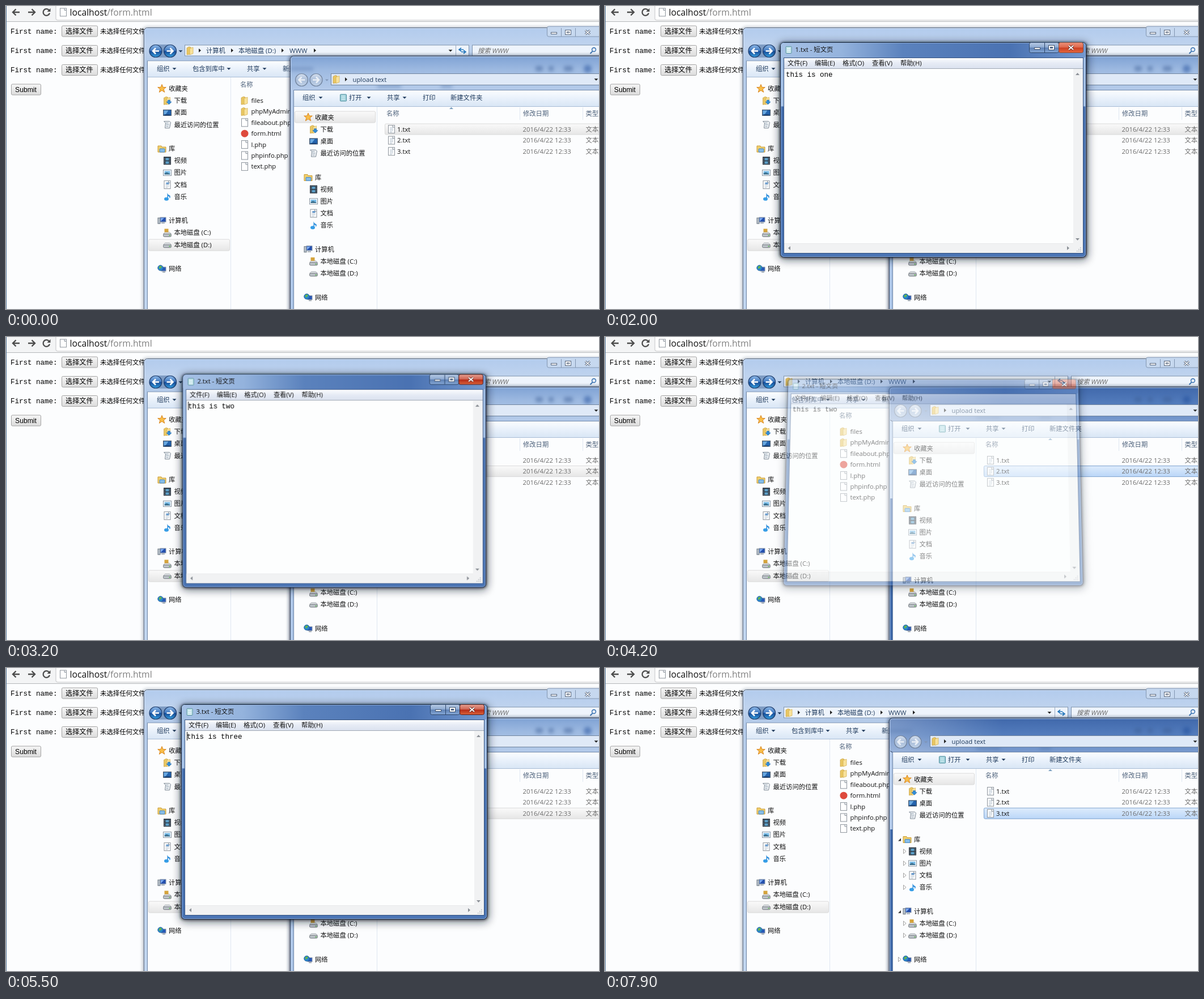
These frames come from a looping animation (1046 by 535 pixels, 8 s). An HTML page:

```html
<!DOCTYPE html>
<html lang="zh-CN">
<head>
<meta charset="utf-8">
<title>Upload form</title>
<style>
html, body { margin: 0; width: 100%; height: 100%; overflow: hidden; background: #fcfdfe; }
svg { position: absolute; left: 0; top: 0; width: 1046px; height: 535px; }
#pad { transform-origin: 579px 254px; }
text { font: 11.3px "Open Sans", "Noto Sans CJK SC", "Noto Sans CJK", sans-serif; fill: #111; white-space: pre; }
text.mono { font: 12.5px "Liberation Mono", "Noto Sans CJK SC", monospace; fill: #000; }
text.cn { font-size: 11.4px; }
text.btn { font: 12.2px "Liberation Sans", "Noto Sans CJK SC", sans-serif; fill: #000; }
text.url { font-size: 15.7px; }
text.dim { fill: #6d6d6d; }
text.head { fill: #4c607a; }
text.bar { fill: #1e395b; }
text.find { fill: #666; font-style: italic; }
</style>
</head>
<body>
<svg id="desk" viewBox="0 0 1046 535"></svg>
<svg id="pad" viewBox="0 0 1046 535"></svg>
<script>
const LOOP = 8000, STEP = 100;
const $ = id => document.getElementById(id);

// Drawing helpers
const rect = (x, y, w, h, fill, stroke = 'none', r = 0, attr = '') =>
  `<rect x="${x}" y="${y}" width="${w}" height="${h}" rx="${r}" fill="${fill}" stroke="${stroke}" ${attr}/>`;
const text = (x, mid, s, cls = '') => `<text x="${x}" y="${mid + 4}" class="${cls}">${s}</text>`;
const path = (d, fill = 'none', stroke = 'none', w = 1, attr = '') =>
  `<path d="${d}" fill="${fill}" stroke="${stroke}" stroke-width="${w}" ${attr}/>`;
const circle = (x, y, r, fill, stroke = 'none', w = 1) =>
  `<circle cx="${x}" cy="${y}" r="${r}" fill="${fill}" stroke="${stroke}" stroke-width="${w}"/>`;
const line = (x1, y1, x2, y2, c) => path(`M${x1} ${y1}L${x2} ${y2}`, 'none', c);
const group = (body, attr = '') => `<g ${attr}>${body}</g>`;
const at = (x, y, body) => group(body, `transform="translate(${x} ${y})"`);
const down = (x, y, c = '#1e395b', s = 3.5) => path(`M${x - s} ${y - s / 2}h${2 * s}l${-s} ${s}z`, c);
const right = (x, y, c = '#222') => path(`M${x - 2} ${y - 3.5}l4 3.5l-4 3.5z`, c);
const grad = (id, stops, across = false) =>
  `<linearGradient id="${id}" x2="${across ? 1 : 0}" y2="${across ? 0 : 1}">` +
  stops.map(([o, c]) => `<stop offset="${o}" stop-color="${c}"/>`).join('') + '</linearGradient>';
const blur = (id, n) => `<filter id="${id}" x="-50%" y="-50%" width="200%" height="200%"><feGaussianBlur stdDeviation="${n}"/></filter>`;

// Icons, centred on 0,0
const sheet = rect(-5.5, -7, 11, 14, '#fff', '#8d949c') + path('M2 -7v3.5h3.5', '#e8edf2', '#8d949c');
const ruled = sheet + path('M-3 -2.5h6M-3 0h6M-3 2.5h6M-3 5h4', 'none', '#aebdcb');
const folder = path('M-6 -5l4 -2l3 1v12l-7 1z', '#e9c763', '#c7a03f', .7) + path('M-1 -4l6 -2v11l-6 2z', '#f8e29b', '#d0ab4c', .7);
const screen = rect(-7, -5, 14, 10, '#2463ad', '#4b5866') + path('M-6 -4h8l-5 7h-3z', '#69a8df') + rect(-5, 3, 10, 2, '#193f70');
const disk = path('M-7 0l3 -3h8l3 3z', '#e6e9ec', '#8a9096', .8) + rect(-7, 0, 14, 5, '#bcc2c8', '#73797f', 2) + rect(3, 2, 2.5, 1.5, '#55b046');
const tower = rect(-7, -5, 4, 10, '#b9c3cd', '#69747f') + rect(-3, -6, 10, 8, '#234fae', '#8a98a8') + path('M-2 -5h6l-6 6z', '#7daaf0') + rect(-1, 3, 6, 2, '#a3adb7');
const icon = {
  sheet, ruled, folder, screen, disk, tower,
  star: path('M0 -7.5l2.1 5h5.2l-4.1 3.4l1.5 5.4l-4.7 -3.2l-4.7 3.2l1.5 -5.4l-4.1 -3.4h5.2z', '#f8bd48', '#d98520'),
  load: folder + path('M1 -1h4v3h2.5l-4.5 4.5l-4.5 -4.5h2.5z', '#2f8fdd', '#1d64a8', .7),
  recent: path('M-6 -6h10l2 2l-2 10h-8l1 -9z', '#eef1f4', '#7e8a96') + path('M-3 -3h5M-2 0h5M-2 3h4', 'none', '#8fa0b0'),
  books: path('M-7 -5h6l1 2h7v9h-14z', '#f0cf6d', '#c99b34') + rect(-4, 0, 9, 6, '#86bde8', '#4a86bb', 1),
  film: rect(-6, -6.5, 12, 13, '#27323e', '#27323e') + rect(-3, -5, 6, 4.5, '#5d9fc8') + rect(-3, 1, 6, 4.5, '#5d9fc8') + path('M-4.7 -5v11M4.7 -5v11', 'none', '#dfe5ea', .9, 'stroke-dasharray="1.5"'),
  image: rect(-7, -5, 14, 10, '#fff', '#8593a1') + rect(-5, -3, 10, 6, '#79bce8') + path('M-5 3v-2l4 -2l6 3v1z', '#3d718f'),
  doc: ruled + rect(-2, -4, 5, 3, '#6196cb'),
  note: path('M0 4v-11q1 4 5 5q1 3 -1 5q0 -4 -2.5 -4v5z', '#2c8ddb') + `<ellipse cx="-1.5" cy="4" rx="4" ry="3" fill="#369de6"/>`,
  system: at(0, 2, disk) + rect(-5, -7, 7, 6, '#d6a43c'),
  globe: rect(-1, -3, 8, 7, '#2858b8', '#8793a3') + circle(-2.5, -1.5, 4.7, '#2b87ca', '#2263a0') + path('M-5 -4q3 -2 5 0l-2 3l-3 1z', '#66b64c') + rect(1, 5, 5, 1.5, '#8c98a5'),
};

// Slot, indent, icon, label, twisty kind
const places = [
  [0, 0, 'star', '收藏夹', 1], [1, 1, 'load', '下载'], [2, 1, 'screen', '桌面'], [3, 1, 'recent', '最近访问的位置'],
  [5, 0, 'books', '库', 1], [6, 1, 'film', '视频', 2], [7, 1, 'image', '图片', 2], [8, 1, 'doc', '文档', 2], [9, 1, 'note', '音乐', 2],
  [11, 0, 'tower', '计算机', 1], [12, 1, 'system', '本地磁盘 (C:)', 2], [13, 1, 'disk', '本地磁盘 (D:)', 2], [15, 0, 'globe', '网络', 2],
];
const slotY = n => 146 + 21.2 * n;
const sidebar = () => places.map(([n, deep, pic, label]) =>
  at(275 + deep * 9.5, slotY(n), icon[pic]) + text(287 + deep * 9.5, slotY(n), label)).join('');
const twisties = () => places.filter(p => p[4]).map(([n, deep, , , kind]) => {
  const x = 262 + deep * 9, y = slotY(n);
  return kind === 1 ? path(`M${x + 2} ${y - 2}v5h-5z`, '#333') : path(`M${x - 2.5} ${y - 4}l4.5 4l-4.5 4z`, '#fff', '#a0a0a0');
}).join('');

const arrow = (x, y, dir) => path(`M${x - 6 * dir} ${y}h${11 * dir}m${-5 * dir} -5l${5 * dir} 5l${-5 * dir} 5`, 'none', '#fff', 2.6);
const navBall = (x, y, fill, edge) => circle(x, y, 11, `url(#${fill})`, edge, 1.2);

function browser() {
  const pick = y => text(8, y, 'First name:', 'mono') + rect(98.5, y - 9.5, 63, 19, 'url(#button)', '#a3a3a3', 2) +
    text(105, y, '选择文件', 'btn') + text(166, y, '未选择任何文件', 'mono cn');
  const back = 'M24 11h-12m5.5 -5.5l-5.5 5.5l5.5 5.5';
  return rect(0, 0, 1046, 27, '#f3f4f5') + rect(88, -4, 970, 29, '#fff', '#c4c6c8', 3) + line(0, 27.5, 1046, 27.5, '#b5b7ba') +
    path(back, 'none', '#4d4d4d', 2.4) + group(path(back, 'none', '#4d4d4d', 2.4), 'transform="matrix(-1 0 0 1 63 0)"') +
    path('M76 7.5a5.8 5.8 0 1 0 1 5', 'none', '#4d4d4d', 2.3) + path('M78.5 4v6h-6z', '#4d4d4d') +
    at(101, 11, sheet) +
    '<text x="112.5" y="17" class="url">localhost<tspan fill="#808080">/form.html</tspan></text>' +
    [44.5, 79, 113].map(pick).join('') +
    rect(9.5, 138, 52, 19, 'url(#button)', '#a3a3a3', 2) + text(16, 147.5, 'Submit', 'btn') +
    rect(0, 0, 1, 535, '#55789c');
}

function rearWindow() {
  const files = [['folder', 'files'], ['folder', 'phpMyAdmin'], ['sheet', 'fileabout.php'], ['', 'form.html'], ['sheet', 'l.php'], ['sheet', 'phpinfo.php'], ['sheet', 'text.php']];
  const crumb = [[353, '计算机'], [410, '本地磁盘 (D:)'], [500, 'WWW']];
  return rect(242, 38, 830, 520, '#24364f', 'none', 6, 'filter="url(#soft)" opacity=".45"') +
    rect(243.5, 38.5, 830, 520, 'url(#rearGlass)', '#4c5f7a', 6) + rect(244.5, 39.5, 830, 520, 'none', '#d8e6f8', 5) +
    rect(954.5, 36, 100, 18, '#c6d8ef', '#8296b2', 3) + line(979.5, 39, 979.5, 54, '#8296b2') + line(1004.5, 39, 1004.5, 54, '#8296b2') +
    rect(961.5, 46.5, 10, 3, '#fff', '#56647a') + rect(986.5, 42.5, 10, 8, '#fff', '#56647a') + rect(989.5, 45.5, 4, 2, '#fff', '#56647a') +
    path('M1022 43l8 7m0 -7l-8 7', 'none', '#56647a', 3.6) + path('M1022 43l8 7m0 -7l-8 7', 'none', '#fff', 1.6) +
    rect(253, 68, 48, 23, '#7f9cc3', 'none', 11) + navBall(264, 79.5, 'ball', '#22406f') + navBall(289.5, 79.5, 'ball', '#22406f') +
    arrow(264, 79.5, -1) + arrow(289.5, 79.5, 1) + down(308, 80) +
    rect(315.5, 69, 501, 19, '#eef4fc', '#7f93ad') + line(793.5, 69, 793.5, 88, '#9bacc4') + at(325, 79, icon.folder) +
    crumb.map(([x, s]) => text(x, 78.5, s, 'bar')).join('') + [342, 399, 488, 545].map(x => right(x, 78.5)).join('') + down(784, 79, '#222') +
    path('M799 77h8M803 74l-4 3l4 3M811 81h-8M807 78l4 3l-4 3', 'none', '#2779bd', 1.6) +
    rect(822.5, 69, 230, 19, '#eef4fc', '#7f93ad') + text(832, 79, '搜索 WWW', 'find') +
    circle(1037, 77, 3.4, 'none', '#4379b5', 1.6) + path('M1034.5 80l-4 4', 'none', '#4379b5', 2) +
    rect(249.5, 97, 810, 450, '#fcfdfe', '#7287a5') + rect(250, 97.5, 800, 28, 'url(#tools)') + line(250, 125.5, 1046, 125.5, '#a9bdd6') +
    [[266, '组织', 297], [329, '包含到库中', 393], [425, '共享', 456], [488, '新建文件夹']].map(([x, s, d]) => text(x, 111, s, 'bar') + (d ? down(d, 111) : '')).join('') +
    line(396.5, 126, 396.5, 535, '#dfe7f1') + rect(251.5, 412, 143, 20, 'url(#grey)', '#d9d9d9', 2) + sidebar() +
    text(413, 139, '名称', 'head') +
    files.map(([pic, s], i) => {
      const y = 167 + 19.4 * i;
      return (pic ? at(421, y, icon[pic]) : circle(421, y, 6.5, '#de4a3c')) + text(432.5, y, s);
    }).join('');
}

const rowY = i => 217.5 + 19.6 * i;
function frontWindow() {
  const smudge = [[934, 106, 13], [957, 106, 9], [984, 106, 16]].map(([x, y, w]) => rect(x, y, w, 9, '#3c5f96', 'none', 3)).join('') +
    circle(1026, 111, 7, '#1d4b9a') + rect(655, 139, 42, 5, '#4c70a5') + rect(767, 139, 20, 5, '#4c70a5') + rect(502, 108, 40, 6, '#5d7fb2');
  return rect(500, 88, 600, 500, '#13233d', 'none', 6, 'filter="url(#soft)" opacity=".8"') +
    rect(501.5, 88.5, 600, 500, 'url(#idleGlass)', '#2c405f', 6) +
    group(rect(501.5, 88.5, 600, 60, 'url(#liveGlass)', '#1d3152', 6) + rect(502, 89, 200, 59, 'url(#shine)', 'none', 5) +
      rect(502, 285, 5, 250, '#3e68a8'), 'id="live"') +
    rect(502.5, 89.5, 598, 500, 'none', '#c3d7f2', 5) + group(smudge, 'filter="url(#soft)" opacity=".5"') +
    navBall(521.5, 130.5, 'paleBall', '#71839d') + navBall(547, 130.5, 'paleBall', '#71839d') + group(arrow(521.5, 130.5, -1) + arrow(547, 130.5, 1), 'opacity=".75"') + down(566, 131, '#7f94b5', 3) +
    rect(573.5, 119.5, 500, 20, '#dfe9f7', '#71859f') + at(583, 129.5, icon.folder) + right(600, 129.5) + text(611.5, 129.5, 'upload text', 'bar') + down(1041, 130, '#222') +
    rect(507.5, 148.5, 600, 450, '#fcfdfe', '#6e86a8') + rect(508, 149, 600, 28, 'url(#tools)') + line(508, 177.5, 1046, 177.5, '#a9bdd6') +
    rect(726.5, 152, 39, 21, '#f2f8ff', '#a9c3e2', 2, 'id="toolHover"') +
    [[523, '组织', 555], [605, '打开', 640], [672, '共享', 703], [735, '打印'], [784, '新建文件夹']].map(([x, s, d]) => text(x, 162, s, 'bar') + (d ? down(d, 162) : '')).join('') +
    at(595, 162, rect(-5.5, -6, 11, 12, '#9fd0da', '#4d8d9c', 1) + path('M-3 -3h6M-3 0h6M-3 3h6', 'none', '#eafafd')) +
    line(654.5, 178, 654.5, 535, '#dfe7f1') + rect(509.5, 186, 142, 20, 'url(#grey)', '#d9d9d9', 2) +
    at(258, 50.5, sidebar() + group(twisties(), 'id="twisties"')) +
    rect(656, 178, 250, 23, '#e3f1fc', '#b9dcf4', 0, 'id="headHover"') +
    line(906.5, 179, 906.5, 201, '#dfe7f1') + line(1017.5, 179, 1017.5, 201, '#dfe7f1') + path('M782 182h7l-3.5 -3.5z', '#7da0c0') +
    [[671, '名称'], [912, '修改日期'], [1022.5, '类型']].map(([x, s]) => text(x, 190, s, 'head')).join('') +
    [0, 1, 2].map(i => rect(668.5, rowY(i) - 9.5, 400, 19, 'none', 'none', 2, `id="row${i}"`) +
      at(680, rowY(i), icon.ruled) + text(690, rowY(i), `${i + 1}.txt`) + text(911.5, rowY(i), '2016/4/22 12:33', 'dim') + text(1022.5, rowY(i), '文本文档', 'dim')).join('');
}

function editor() {
  const menu = [[322, '文件(F)'], [370, '编辑(E)'], [419, '格式(O)'], [471, '查看(V)'], [521, '帮助(H)']];
  const tip = (x, y, turn) => group(path('M-3.5 2h7l-3.5 -4z', '#8b9096'), `transform="translate(${x} ${y}) rotate(${turn})"`);
  return rect(308, 66, 543, 382, '#0c1420', 'none', 7, 'filter="url(#wide)" opacity=".6"') +
    rect(308, 64, 542, 381, '#0c1420', 'none', 7, 'filter="url(#tight)" opacity=".7"') +
    rect(309.5, 64.5, 539, 379, 'url(#padSide)', '#14233c', 6) + rect(310, 65, 538, 27, 'url(#padTop)', 'none', 5) +
    rect(310.5, 65.5, 537, 377, 'none', '#a5c4ec', 5, 'stroke-opacity=".7"') +
    rect(748.5, 64.5, 52, 18, 'url(#caption)', '#2c4468', 3) + line(775.5, 65, 775.5, 82, '#2c4468') +
    rect(800.5, 64.5, 43, 18, 'url(#red)', '#5a1d19', 3) + rect(800.5, 64.5, 43, 18, '#ff7040', '#ffc08c', 3, 'id="glow" opacity=".3"') +
    rect(757.5, 73.5, 10, 3, '#fff', '#43546d') + rect(782.5, 69.5, 10, 8, '#fff', '#43546d') + rect(785.5, 72.5, 4, 2, '#5b7fb3', '#43546d') +
    path('M818 70l8 7m0 -7l-8 7', 'none', '#5c2b28', 3.8) + path('M818 70l8 7m0 -7l-8 7', 'none', '#fff', 2) +
    at(324, 77.5, rect(-5, -6, 10, 12, '#bfe3ea', '#5f95a0', 1) + path('M-3 -2h6M-3 1h6M-3 4h6', 'none', '#fff')) +
    '<text id="title" x="335.5" y="81"></text>' +
    rect(315.5, 91.5, 528, 345, '#fdfefe', '#33517f') + rect(316, 92, 527, 18, 'url(#menu)') + line(316, 110.5, 843, 110.5, '#a0a8b4') +
    menu.map(([x, s]) => text(x, 100.5, s)).join('') +
    rect(826, 111, 17, 309, '#f1f2f3') + rect(316, 420, 527, 16, '#f1f2f3') + line(316, 419.5, 826, 419.5, '#e7e8e9') +
    tip(833.5, 120, 0) + tip(833.5, 412, 180) + tip(325, 427.5, -90) + tip(817, 427.5, 90) +
    [[838, 426], [835, 429], [838, 429], [832, 432], [835, 432], [838, 432]].map(([x, y]) => rect(x, y, 1.5, 1.5, '#b4b8bd')).join('') +
    '<text id="words" class="mono" x="319" y="125"></text>' + rect(319, 113, 1, 15, '#000', 'none', 0, 'id="caret"');
}

const deskDefs = blur('soft', 3) +
  grad('button', [[0, '#f6f6f6'], [1, '#dcdcdc']]) + grad('tools', [[0, '#fbfdff'], [.5, '#e9f1fb'], [1, '#d9e6f5']]) +
  grad('grey', [[0, '#fafafa'], [1, '#e6e6e6']]) + grad('blue', [[0, '#deecfc'], [1, '#bad6f8']]) + grad('hover', [[0, '#fafcfe'], [1, '#e8f2fd']]) +
  grad('rearGlass', [[0, '#b2cbed'], [.06, '#bfd3ee'], [.12, '#b1c8e7'], [1, '#c0d5ef']]) +
  grad('idleGlass', [[0, '#7fa2d4'], [.05, '#9ebae1'], [.12, '#b5cbea'], [1, '#a9c3e6']]) +
  grad('liveGlass', [[0, '#4068ab'], [.5, '#547dbd'], [1, '#7a9bce']]) +
  grad('shine', [[0, '#fff4'], [1, '#fff0']], true) +
  grad('ball', [[0, '#8fb9e8'], [.48, '#3f78bf'], [.52, '#164a96'], [1, '#35a0e0']]) + grad('paleBall', [[0, '#d5e0ef'], [.5, '#a9bdd9'], [1, '#c0d2e8']]);
const padDefs = blur('wide', 8) + blur('tight', 2) +
  grad('padTop', [[0, '#a6c1e5'], [.2, '#94b3dd'], [.4, '#5b82bd'], [.75, '#4a72b2'], [1, '#7398cf']], true) +
  grad('padSide', [[0, '#9dbbe2'], [.295, '#a5c1e6'], [.3, '#426cab'], [1, '#4a74b4']]) +
  grad('caption', [[0, '#b9cce6'], [.48, '#8ba8d0'], [.52, '#5d80b4'], [1, '#86a8d6']]) +
  grad('red', [[0, '#e6a193'], [.48, '#cf6351'], [.52, '#b52a16'], [1, '#d9643c']]) + grad('menu', [[0, '#fbfcfe'], [.5, '#e6ebf5'], [1, '#dbe2ef']]);

$('desk').innerHTML = `<defs>${deskDefs}</defs>` + browser() + rearWindow() + frontWindow();
$('pad').innerHTML = `<defs>${padDefs}</defs>` + editor();

// One entry per opened file; times in ms
const visits = [
  { word: 'one', over: 600, pick: 1000, open: 1150, full: 1500, blink: [1700], aim: 2000, close: 2150 },
  { word: 'two', over: 2500, pick: 2700, open: 2950, full: 3300, blink: [3600], aim: 3900, close: 4050 },
  { word: 'three', over: 5000, pick: 5100, open: 5250, full: 5500, blink: [5800, 6300], aim: 5900, close: 6650 },
];
const FADE = 300;
const looks = { none: ['none', 'none'], grey: ['url(#grey)', '#d9d9d9'], hover: ['url(#hover)', '#b8d6f5'], blue: ['url(#blue)', '#7da2ce'] };
const clamp = v => Math.max(0, Math.min(1, v));
const show = (id, on) => $(id).setAttribute('visibility', on ? 'visible' : 'hidden');

function draw(ms) {
  const t = Math.floor(ms / STEP) * STEP;
  const busy = visits.some(v => t >= v.open && t < v.close);
  const active = t >= 1000 && !busy;
  let chosen = 0, pointed = -1;
  visits.forEach((v, i) => {
    if (t >= v.pick) chosen = i;
    if (t >= v.over && t < v.pick) pointed = i;
  });
  for (let i = 0; i < 3; i++) {
    const look = i === chosen && active ? 'blue' : i === pointed ? 'hover' : i === chosen ? 'grey' : 'none';
    $('row' + i).setAttribute('fill', looks[look][0]);
    $('row' + i).setAttribute('stroke', looks[look][1]);
  }
  show('live', active);
  $('twisties').setAttribute('opacity', clamp((t - 7500) / 400));
  show('toolHover', t === 300);
  show('headHover', t >= 400 && t < 600);

  const n = visits.findIndex(v => t >= v.open && t < v.close + FADE);
  const pad = $('pad');
  pad.style.display = n < 0 ? 'none' : 'block';
  if (n < 0) return;
  const v = visits[n];
  const rise = 1 - (1 - clamp((t - v.open) / (v.full - v.open))) ** 2;
  const fall = clamp((t - v.close) / FADE);
  pad.style.opacity = Math.min(1, rise * 1.1) * (1 - fall);
  pad.style.transform = rise === 1 && !fall ? 'none' :
    `perspective(1200px) rotateX(${12 * fall}deg) scale(${(.9 + .1 * rise) * (1 - .07 * fall)})`;
  $('title').textContent = `${n + 1}.txt - 短文页`;
  $('words').textContent = 'this is ' + v.word;
  show('caret', v.blink.filter(b => t >= b).length % 2 === 0);
  show('glow', t >= v.aim);
}

const start = performance.now();
function tick() {
  draw((performance.now() - start) % LOOP);
  requestAnimationFrame(tick);
}
tick();
</script>
</body>
</html>
```
